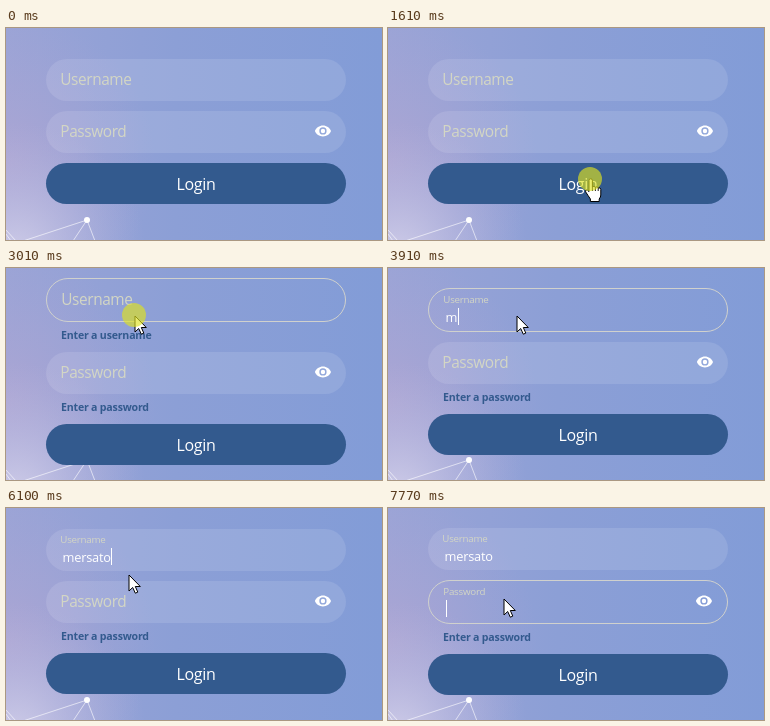
Animation, 376 px wide and 212 px high, one loop 8 s. Source, as an HTML page:

```html
<!DOCTYPE html>
<html lang="en">
<head>
<meta charset="utf-8">
<title>Login form</title>
<style>
  html, body { margin: 0; width: 100%; height: 100%; overflow: hidden; }
  svg { display: block; width: 100vw; height: 100vh; }
  text { font-family: "Open Sans", "Noto Sans", sans-serif; white-space: pre; }
  .label { font-size: 15.4px; letter-spacing: -.4px; fill: #d3d6c4; }
  .value { font-size: 12.8px; letter-spacing: -.2px; fill: #fff; }
  .error { font-size: 10.6px; letter-spacing: -.2px; font-weight: 700; fill: #335a8e; }
  .login { font-size: 16px; letter-spacing: -.3px; fill: #fff; text-anchor: middle; }
</style>
</head>
<body>
<svg viewBox="0 0 376 212">
  <defs>
    <linearGradient id="sky">
      <stop offset="0" stop-color="#9ba4d6"/>
      <stop offset=".45" stop-color="#8c9fd6"/>
      <stop offset="1" stop-color="#829cd7"/>
    </linearGradient>
    <radialGradient id="mauve" gradientUnits="userSpaceOnUse" cx="0" cy="135" r="150">
      <stop offset="0" stop-color="#b2a6d2" stop-opacity=".75"/>
      <stop offset="1" stop-color="#a8a4d4" stop-opacity="0"/>
    </radialGradient>
    <radialGradient id="glow" gradientUnits="userSpaceOnUse" cx="10" cy="225" r="130">
      <stop offset="0" stop-color="#d3d0ea" stop-opacity=".9"/>
      <stop offset="1" stop-color="#b5b4de" stop-opacity="0"/>
    </radialGradient>
  </defs>
  <rect width="376" height="212" fill="url(#sky)"/>
  <rect width="376" height="212" fill="url(#mauve)"/>
  <rect width="376" height="212" fill="url(#glow)"/>
  <path d="M81 192L17 213M81 192L67 213M81 192L89 213M0 202L10 213M0 206L5 213"
        fill="none" stroke="#fff" stroke-opacity=".75" stroke-width=".8"/>
  <circle cx="81" cy="192" r="3" fill="#fff"/>
  <g id="form"></g>
  <g id="arrow">
    <path d="M.5 .5V16.5L4.2 13L6.8 18.7L9.3 17.6L6.8 12H11.8Z" fill="#fff" stroke="#000"/>
  </g>
  <g id="hand">
    <path d="M-2 1.5A1.7 1.7 0 0 1 1.4 1.5V8Q3 6.6 4.4 8.2Q6.1 7.2 7.2 8.8Q9.4 8.2 9.8 10.4V16Q9.8 18 8.2 20V22.5H-.6V20Q-3 16.5-5.4 12.8Q-6 10.6-3.8 10.8L-2 12.6Z"
          fill="#fff" stroke="#000" stroke-linejoin="round"/>
    <path d="M1.4 8V12M4.4 8.2V12M7.2 8.8V12" stroke="#000" stroke-width=".9"/>
  </g>
  <circle id="press" r="12" fill="#dee21e" fill-opacity=".65"/>
</svg>
<script>
const LOOP = 8000, LEFT = 40, WIDTH = 300, MIDDLE = 103.5;
const NAME = 'mersato';
const KEYS = [3910, 4040, 4170, 4360, 4510, 4640, 4770];
const EYE = 'M12 4.5C7 4.5 2.7 7.6 1 12c1.7 4.4 6 7.5 11 7.5s9.3-3.1 11-7.5c-1.7-4.4-6-7.5-11-7.5z' +
  'M12 17a5 5 0 1 1 0-10a5 5 0 0 1 0 10zM12 9a3 3 0 1 0 0 6a3 3 0 0 0 0-6z';
// start, end, from x, y, to x, y
const MOVES = [
  [720, 1280, 257, 199, 203, 152],
  [2470, 2940, 168, 97, 129, 48],
  [5960, 6280, 129, 48, 115.5, 90.5]
];
const PRESSES = [[1610, 1750], [2940, 3160], [6380, 6710]];

const $ = id => document.getElementById(id);
const between = (t, a, b) => t >= a && t < b;
const clamp = v => Math.max(0, Math.min(1, v));
const smooth = v => v * v * (3 - 2 * v);
const mix = (a, b, p) => a + (b - a) * p;
const show = (el, on) => el.setAttribute('visibility', on ? 'visible' : 'hidden');
const place = (el, x, y, scale = 1) =>
  el.setAttribute('transform', `translate(${x} ${y}) scale(${scale})`);

function add(parent, tag, attrs, text = '') {
  const el = document.createElementNS('http://www.w3.org/2000/svg', tag);
  for (const k in attrs) el.setAttribute(k, attrs[k]);
  el.textContent = text;
  parent.appendChild(el);
  return el;
}

function makeField(title, message, hasEye) {
  const root = add($('form'), 'g', {});
  const box = add(root, 'rect', {});
  const inner = add(root, 'g', {});
  const label = add(inner, 'text', { class: 'label' }, title);
  const value = add(inner, 'text', { class: 'value', x: 16.5, y: 33 });
  const caret = add(inner, 'rect', { y: 19, width: 1, height: 17, fill: '#fff' });
  if (hasEye) {
    add(inner, 'path', { d: EYE, fill: '#fff', 'fill-rule': 'evenodd',
      transform: 'translate(268.2 11.2) scale(.73)' });
  }
  const error = add(root, 'text', { class: 'error', x: LEFT + 15 }, message);
  return { box, inner, label, value, caret, error };
}

const user = makeField('Username', 'Enter a username', false);
const pass = makeField('Password', 'Enter a password', true);
const button = add($('form'), 'g', {});
add(button, 'rect', { width: WIDTH, height: 41, rx: 20.5, fill: '#335a8e' });
add(button, 'text', { class: 'login', x: 150, y: 27 }, 'Login');

// Draws a field at the given top and returns the top of the next row.
function drawField(f, top, s) {
  const edge = s.hover ? 1 : 0, height = 42 + 2 * edge;
  const look = s.hover
    ? { x: LEFT + .5, y: top + .5, width: WIDTH - 1, height: height - 1, rx: 21.5,
        fill: 'none', stroke: '#d0d1cd' }
    : { x: LEFT, y: top, width: WIDTH, height, rx: 21,
        fill: 'rgba(255,255,255,.11)', stroke: 'none' };
  for (const k in look) f.box.setAttribute(k, look[k]);
  place(f.inner, LEFT, top + edge);
  // the eye moves one pixel left under the border, the text one pixel right
  const eye = f.inner.querySelector('path');
  if (eye) eye.setAttribute('transform', `translate(${268.2 - edge} 11.2) scale(.73)`);
  place(f.label, 14.3 + edge, mix(26, 13.5, s.lift), mix(1, .635, s.lift));
  if (f.value.textContent !== s.text) f.value.textContent = s.text;
  f.value.setAttribute('x', 16.5 + edge);
  const end = s.text ? Math.round(f.value.getComputedTextLength()) : 0;
  f.caret.setAttribute('x', 17 + edge + end);
  show(f.caret, s.caret);
  f.error.setAttribute('y', top + height + 17);
  show(f.error, s.error);
  return top + height + (s.error ? 30 : 10);
}

function drawPointer(t) {
  const move = MOVES.filter(m => t >= m[0]).pop();
  let x = 0, y = 0;
  if (move) {
    const [a, b, x0, y0, x1, y1] = move;
    const p = t >= b ? 1 : clamp(Math.floor((t - a) / 70) * 70 / (b - a));
    x = mix(x0, x1, p);
    y = mix(y0, y1, p);
  }
  const hand = t < 2470 && y < 176;
  show($('arrow'), move && !hand);
  show($('hand'), move && hand);
  place($('arrow'), Math.round(x) - .5, Math.round(y) - .5);
  place($('hand'), x, y - 1);
  place($('press'), x - 1, y - 1);
  show($('press'), PRESSES.some(p => between(t, p[0], p[1])));
}

function render(t) {
  const u = {
    hover: between(t, 2810, 6090),
    lift: smooth(clamp((t - 3130) / 300)),
    text: NAME.slice(0, KEYS.filter(k => t >= k).length),
    caret: between(t, 3160, 3710) || between(t, 3910, 5300) || between(t, 5830, 6360),
    error: between(t, 1750, 3910)
  };
  const p = {
    hover: between(t, 2530, 2670) || t >= 6170,
    lift: smooth(clamp((t - 6690) / 330)),
    text: '',
    caret: between(t, 6710, 7240) || t >= 7770,
    error: t >= 1750
  };
  const total = 145 + 2 * (u.hover + p.hover) + 20 * (u.error + p.error);
  const next = drawField(user, MIDDLE - total / 2, u);
  place(button, LEFT, drawField(pass, next, p));
  drawPointer(t);
}

const start = performance.now();
function tick() {
  render((performance.now() - start) % LOOP);
  requestAnimationFrame(tick);
}
tick();
</script>
</body>
</html>
```
